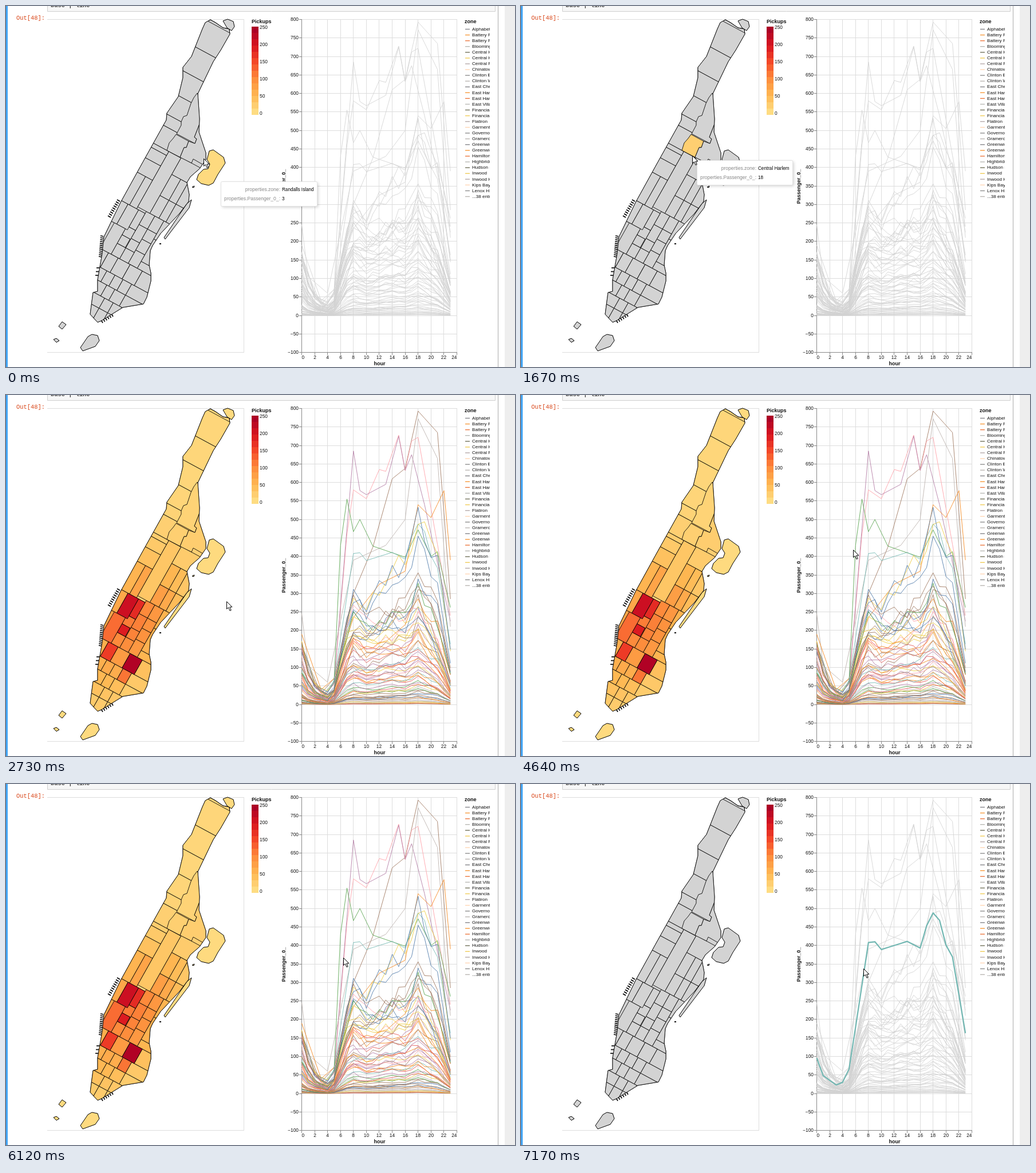
An HTML page with a canvas for the animation above (8 s loop, 889 px wide and 630 px high).

```html
<!DOCTYPE html>
<html lang="en">
<head>
<meta charset="utf-8">
<title>Pickups by zone and hour</title>
<style>
html, body { margin: 0; width: 100%; height: 100%; overflow: hidden; background: #fff; }
canvas { display: block; }
</style>
</head>
<body>
<canvas id="stage" width="889" height="630"></canvas>
<script>
const ctx = document.getElementById('stage').getContext('2d');
const LOOP = 8000, GRAY = '#d3d3d3', INK = '#111';
const SANS = '"Liberation Sans", Arial, sans-serif', MONO = '"Liberation Mono", monospace';
const PALETTE = ['#4c78a8', '#f58518', '#e45756', '#72b7b2', '#54a24b', '#eeca3b', '#b279a2', '#ff9da6', '#9d755d', '#bab0ac'];

// ---------- helpers ----------
const poly = points => new Path2D('M' + points + 'Z');
const xOf = hour => 516.5 + hour * 11.29;
const yOf = value => 540 - value * 0.6456;
const lerp = (a, b, k) => a + (b - a) * k;

function text(s, x, y, { size = 8.4, align = 'left', color = INK, bold = false, family = SANS } = {}) {
  ctx.font = `${bold ? 'bold ' : ''}${size}px ${family}`;
  ctx.textAlign = align;
  ctx.textBaseline = 'middle';
  ctx.fillStyle = color;
  ctx.fillText(s, x, y);
}
function line(x0, y0, x1, y1, color = '#ddd', width = 1) {
  ctx.strokeStyle = color;
  ctx.lineWidth = width;
  ctx.beginPath();
  ctx.moveTo(x0, y0);
  ctx.lineTo(x1, y1);
  ctx.stroke();
}
function box(x, y, w, h, color) {
  ctx.fillStyle = color;
  ctx.fillRect(x, y, w, h);
}

const RAMP = [[254, 220, 130], [254, 183, 82], [253, 141, 60], [245, 75, 41], [217, 22, 32], [172, 0, 38]];
function heat(value) {
  const t = Math.min(value / 50, 4.999), i = Math.floor(t);
  return `rgb(${RAMP[i].map((c, k) => Math.round(lerp(c, RAMP[i + 1][k], t - i)))})`;
}

let seed = 11;
const random = () => (seed = seed * 16807 % 2147483647) / 2147483647;

// ---------- map ----------
const island = poly(
  '343,40 348,29 357,24 366,29 379,38 390,40 391,49 375,77 362,97 335,153 338,197 337,220 349,256 349,268 ' +
  '338,284 322,298 316,308 320,329 319,341 303,362 270,397 256,418 252,427 250,452 253,466 253,480 246,508 ' +
  '240,520 204,526 167,549 160,552 147,538 152,500 160,498 160,478 168,432 171,403 200,343 237,276 280,199 ' +
  '281,187 301,158 309,125 309,107 324,88');

// The street grid is tilted: u runs along the streets, v along the avenues.
function block(u0, u1, v0, v1) {
  const at = (u, v) => `${232 + u * 0.88 + v * 0.49},${347 + u * 0.475 - v * 0.87}`;
  return poly([at(u0, v0), at(u1, v0), at(u1, v1), at(u0, v1)].join(' '));
}
const bell = x => Math.exp(-x * x);
const zones = [];
function tile(us, vs) {
  for (let i = 1; i < us.length; i++) for (let j = 1; j < vs.length; j++) {
    const u = (us[i - 1] + us[i]) / 2, v = (vs[j - 1] + vs[j]) / 2;
    zones.push([8 + 105 * bell((u - 15) / 65) * bell((v + 50) / 115), block(us[i - 1], us[i], vs[j - 1], vs[j])]);
  }
}
tile([-60, 140], [107, 143, 163, 201, 243, 290, 340]);
tile([-45, 0], [49, 78, 99, 107]);
tile([-45, -14, 0], [-8, 49]);
tile([24, 90], [74, 108]);
tile([24, 42, 56, 90], [-4, 32, 74]);
tile([-45, -17], [-99, -48, -8]);
tile([0, 17], [-99, -77, -60, -42, -8]);
tile([17, 34], [-99, -77, -58, -30, -4]);
tile([34, 52], [-99, -72, -50, -30, -4]);
tile([52, 90], [-99, -85, -40, -4]);
tile([-45, -5, 14, 38, 62, 95], [-128, -99]);
tile([-20, 8, 24, 40, 57, 110], [-150, -128]);
tile([0, 20, 36, 57, 110], [-172, -150]);
tile([0, 28, 45, 62], [-220, -192, -172]);

const park = block(0, 24, -4, 107);
const harlemNorth = poly('334,152 345,175 345,200 338,206 329,229 333,232 330,240 298,223 306,208 306,202 310,193 316,191 323,170 328,160');
const harlem = poly('297,224 319,236 315,247 311,247 304,264 281,252 285,239 292,231');
const eastHarlem = poly('338,206 350,230 360,268 346,278 327,267 324,274 304,264 311,247 315,247 319,236 330,240 333,232 329,229');
const randalls = poly('355,253 362,251 380,264 383,274 370,294 362,309 354,313 341,310 333,303 336,294 345,285 353,284 356,276 351,268');
zones.push(
  [30, park], [12, harlemNorth], [18, harlem], [20, eastHarlem],
  [215, block(-17, 4, -48, -8)], [180, block(4, 17, -42, -8)], [195, block(0, 16, -77, -60)],
  [125, block(-22, 0, -99, -48)], [165, block(-5, 14, -128, -99)],
  [245, block(38, 62, -128, -99)], [118, block(40, 57, -150, -128)]);

const islets = [
  randalls,
  poly('379,26 387,23 397,27 399,36 394,43 386,38'),
  poly('324,338 320,352 278,407 276,404 305,361 316,345'),
  poly('150,573 160,575 163,584 156,594 134,602 130,596 143,577'),
  poly('92,559 98,551 105,556 98,564'),
  poly('83,582 88,580 93,584 88,587'),
  poly('325,316 329,314 328,317')];

function piers(count, x0, y0, x1, y1, dx, dy) {
  for (let i = 0; i < count; i++) {
    const x = lerp(x0, x1, i / (count - 1)), y = lerp(y0, y1, i / (count - 1));
    line(x, y, x + dx, y + dy, '#000', 1.6);
  }
}

function drawMap(colored, hovered) {
  const paint = ([value, path]) => {
    ctx.fillStyle = colored || path === hovered ? heat(value) : GRAY;
    ctx.fill(path);
    ctx.stroke(path);
  };
  piers(9, 199, 341, 183, 369, -5, -3);
  piers(12, 170, 402, 167, 438, -5, -1);
  piers(3, 165, 457, 163, 470, -7, 0);
  piers(6, 166, 548, 184, 537, 3, 5);
  ctx.strokeStyle = '#000';
  ctx.lineWidth = 0.85;
  ctx.lineJoin = 'round';
  paint([8, island]);
  ctx.save();
  ctx.clip(island);
  zones.forEach(paint);
  ctx.restore();
  ctx.stroke(island);
  ctx.lineWidth = 1;
  islets.forEach(path => paint([3, path]));
  box(268, 414, 3, 2, '#000');
}

// ---------- line chart ----------
// Expands "hour:value" key points into one value per hour.
function hourly(keys) {
  const points = keys.split(' ').map(key => key.split(':').map(Number));
  return Array.from({ length: 24 }, (_, h) => {
    const i = Math.max(1, points.findIndex(([hour]) => hour >= h));
    const [h0, v0] = points[i - 1], [h1, v1] = points[i];
    return lerp(v0, v1, (h - h0) / (h1 - h0));
  });
}
const MORNING = hourly('0:.2 1:.1 4:.04 5:.14 7:.9 8:1.04 10:.84 15:.88 16:.81 18:1 21:.55 23:.2');
const EVENING = hourly('0:.35 2:.12 4:.07 5:.11 8:.54 10:.51 15:.74 16:.75 18:1 21:.8 23:.3');
const NIGHT = hourly('0:1 1:.45 3:.15 5:0 23:0');

const busy = (color, keys) => ({ color: PALETTE[color], values: hourly(keys) });

function typical(color, peak, evening, late = 0) {
  const values = MORNING.map((m, h) =>
    peak * lerp(m, EVENING[h], evening) * (1 + (random() - 0.5) * 0.17) + NIGHT[h] * late);
  return { color: PALETTE[color], values };
}
const greenLine = busy(4, '0:85 3:18 5:62 6:430 7:555 8:467 9:500 11:428 14:410 16:398 18:472 20:400 21:413 23:262');
const tealLine = busy(3, '0:96 1:48 3:23 4:30 5:66 6:178 8:408 9:410 10:389 14:411 16:393 17:453 18:488 19:468 20:401 21:369 23:163');
const series = [
  busy(8, '0:150 3:30 5:70 8:300 11:425 14:610 16:638 18:793 21:735 22:520 23:285'),
  busy(7, '0:60 3:15 5:55 7:460 8:580 10:556 12:635 13:630 15:728 16:632 17:712 18:722 23:240'),
  busy(6, '0:50 3:10 5:60 8:685 9:578 10:567 13:595 15:725 16:633 17:675 19:540 23:225'),
  busy(9, '0:245 1:105 4:60 8:390 13:430 16:500 18:772 21:665 22:420 23:210'),
  busy(1, '0:190 3:40 5:70 8:235 12:325 16:360 18:540 20:505 22:578 23:390'),
  greenLine, tealLine,
  typical(5, 511, 0.95), typical(0, 495, 0.9), typical(0, 424, 0.75), typical(8, 352, 0.9, 60)];
const COUNT = 55;
for (let i = 0; i < COUNT; i++) {
  const peak = 2 + 335 * ((i + random()) / COUNT) ** 1.6;
  series.push(typical(Math.floor(random() * 10), peak, random() ** 1.5, peak * 0.6 * random() ** 3));
}

function drawSeries({ values }, color, width) {
  ctx.strokeStyle = color;
  ctx.lineWidth = width;
  ctx.beginPath();
  values.forEach((v, h) => ctx.lineTo(xOf(h), yOf(v)));
  ctx.stroke();
}

function drawChart(colored, hovered) {
  for (let v = -100; v <= 800; v += 50) {
    const y = Math.floor(yOf(v)) + 0.5;
    line(516, y, 788, y);
    line(512, y, 516, y, '#888');
    text(String(v).replace('-', '−'), 511, y, { align: 'right' });
  }
  for (let h = 0; h <= 24; h += 2) {
    const x = Math.floor(xOf(h)) + 0.5;
    line(x, 23, x, 605);
    line(x, 605, x, 609, '#888');
    const align = h === 0 ? 'left' : h === 24 ? 'right' : 'center';
    text(h, x, 614, { align });
  }
  line(516.5, 23, 516.5, 605, '#888');
  line(516, 604.5, 788, 604.5, '#888');
  text('hour', 652.5, 625, { size: 9, align: 'center', bold: true });
  ctx.save();
  ctx.translate(486, 315);
  ctx.rotate(-Math.PI / 2);
  text('Passenger_0_', 0, 0, { size: 9, align: 'center', bold: true });
  ctx.restore();
  series.forEach(s => drawSeries(s, colored ? s.color : GRAY, 0.85));
  if (hovered) drawSeries(hovered, hovered.color, 2.2);
}

// ---------- page and legends ----------
const ZONE_NAMES = ['Alphabet City', 'Battery Park', 'Battery Park City', 'Bloomingdale', 'Central Harlem', 'Central Harlem North',
  'Central Park', 'Chinatown', 'Clinton East', 'Clinton West', 'East Chelsea', 'East Harlem North', 'East Harlem South',
  'East Village', 'Financial District', 'Financial District', 'Flatiron', 'Garment District', 'Governor’s Island', 'Gramercy',
  'Greenwich Village', 'Greenwich Village', 'Hamilton Heights', 'Highbridge Park', 'Hudson Sq', 'Inwood', 'Inwood Hill Park',
  'Kips Bay', 'Lenox Hill', '...38 entries'];
const KEY_COLORS = ['#85858a', '#f79a3c', '#ec7840', '#b9b9b4', '#73735c', '#f0cc58', '#b5a9a9', '#ffd6b4', '#8f8f8f', '#bab6b2'];

function drawPage() {
  box(0, 0, 889, 630, '#fff');
  box(0, 0, 3, 630, '#42a5f5');
  box(859, 0, 1, 630, '#ababab');
  box(871, 0, 18, 630, '#eee');
  box(72, -5, 783, 15, '#f7f7f7');
  ctx.strokeStyle = '#cfcfcf';
  ctx.lineWidth = 1;
  ctx.strokeRect(72.5, -5.5, 782, 15);
  text('base | line', 78, -1, { size: 10.4, bold: true, color: '#444', family: MONO });
  text('Out[48]:', 18, 21, { size: 10.4, color: '#d84315', family: MONO });
  line(72, 23.5, 416, 23.5);
  line(415.5, 23, 415.5, 605);
  line(72, 604.5, 416, 604.5);
}

function drawLegends() {
  text('Pickups', 429, 27.5, { size: 9, bold: true });
  for (let i = 0; i < 14; i++) box(429, 36 + i * 11, 12, 11, heat(250 * (1 - i / 13)));
  for (let i = 0; i <= 5; i++) text(250 - i * 50, 443, 37.5 + i * 30.1);

  text('zone', 801, 27.5, { size: 9, bold: true });
  ctx.save();
  ctx.beginPath();
  ctx.rect(800, 32, 45, 310);
  ctx.clip();
  ZONE_NAMES.forEach((name, i) => {
    const y = 40.5 + i * 10.07;
    line(802, y, 810, y, KEY_COLORS[i % 10], 1.4);
    text(name, 814, y, { size: 8.1 });
  });
  ctx.restore();
}

function drawTooltip({ name, count }, x, y) {
  const nameSize = 8.15;
  ctx.font = `${nameSize}px ${SANS}`;
  const width = 113.5 + ctx.measureText(name).width;
  ctx.save();
  ctx.shadowColor = 'rgba(0,0,0,.18)';
  ctx.shadowBlur = 5;
  ctx.shadowOffsetX = ctx.shadowOffsetY = 2;
  ctx.beginPath();
  ctx.roundRect(x + 0.5, y + 0.5, width - 1, 43, 2);
  ctx.fillStyle = '#fff';
  ctx.fill();
  ctx.restore();
  ctx.strokeStyle = '#e0e0e0';
  ctx.lineWidth = 1;
  ctx.stroke();
  [['properties.zone:', name], ['properties.Passenger_0_:', count]].forEach(([key, value], row) => {
    const rowY = y + 15 + row * 15.5;
    text(key, x + 104, rowY, { size: 8.55, align: 'right', color: '#888' });
    text(value, x + 107, rowY, { size: nameSize, color: '#000' });
  });
}

const arrow = poly('.5,.5 .5,13.5 3.5,10.8 6,16.5 8.2,15.5 5.8,10 10,10');
function drawCursor(x, y) {
  ctx.save();
  ctx.translate(x, y);
  ctx.fillStyle = '#fff';
  ctx.fill(arrow);
  ctx.strokeStyle = '#000';
  ctx.lineWidth = 1;
  ctx.stroke(arrow);
  ctx.restore();
}

// ---------- timeline ----------
const centralHarlem = { zone: harlem, name: 'Central Harlem', count: 18 };
const HOVERS = [
  [0, { zone: randalls, name: 'Randalls Island', count: 3, dx: 30, dy: 40 }],
  [70, { zone: eastHarlem, name: 'East Harlem North', count: 20 }],
  [150, centralHarlem],
  [700, { zone: harlemNorth, name: 'Central Harlem North', count: 12 }],
  [1420, centralHarlem],
  [1740, { zone: park, name: 'Central Park', count: 30 }],
  [2210, {}],
  [5290, { line: greenLine }],
  [5970, {}],
  [6540, { line: tealLine }]];

// Pointer moves: begin, end, x, y. It rests in between.
const MOVES = [
  [70, 230, 304, 242], [620, 870, 312, 212], [1270, 1670, 299, 261], [1670, 2020, 284, 311], [2080, 2350, 366, 369],
  [2660, 2730, 385, 360], [2810, 3490, 565, 281], [3560, 3710, 578, 271], [3960, 5120, 582, 270],
  [5290, 5500, 584, 280], [5970, 6120, 589, 303], [6230, 6620, 589, 313], [7100, 7170, 598, 322]];

function pointerAt(t) {
  let x = 345, y = 266;
  for (const [begin, end, toX, toY] of MOVES) {
    const k = Math.min(1, Math.max(0, (t - begin) / (end - begin)));
    x = lerp(x, toX, k);
    y = lerp(y, toY, k);
  }
  return [Math.round(x), Math.round(y)];
}

const start = performance.now();
function draw() {
  const t = (performance.now() - start) % LOOP;
  const hover = HOVERS.findLast(([time]) => time <= t)[1];
  const colored = !hover.zone && !hover.line;
  const [x, y] = pointerAt(t);
  drawPage();
  drawMap(colored, hover.zone);
  drawChart(colored, hover.line);
  drawLegends();
  if (hover.zone) drawTooltip(hover, x + (hover.dx || 8), y + (hover.dy || 8));
  drawCursor(x, y);
  requestAnimationFrame(draw);
}
draw();
</script>
</body>
</html>
```
